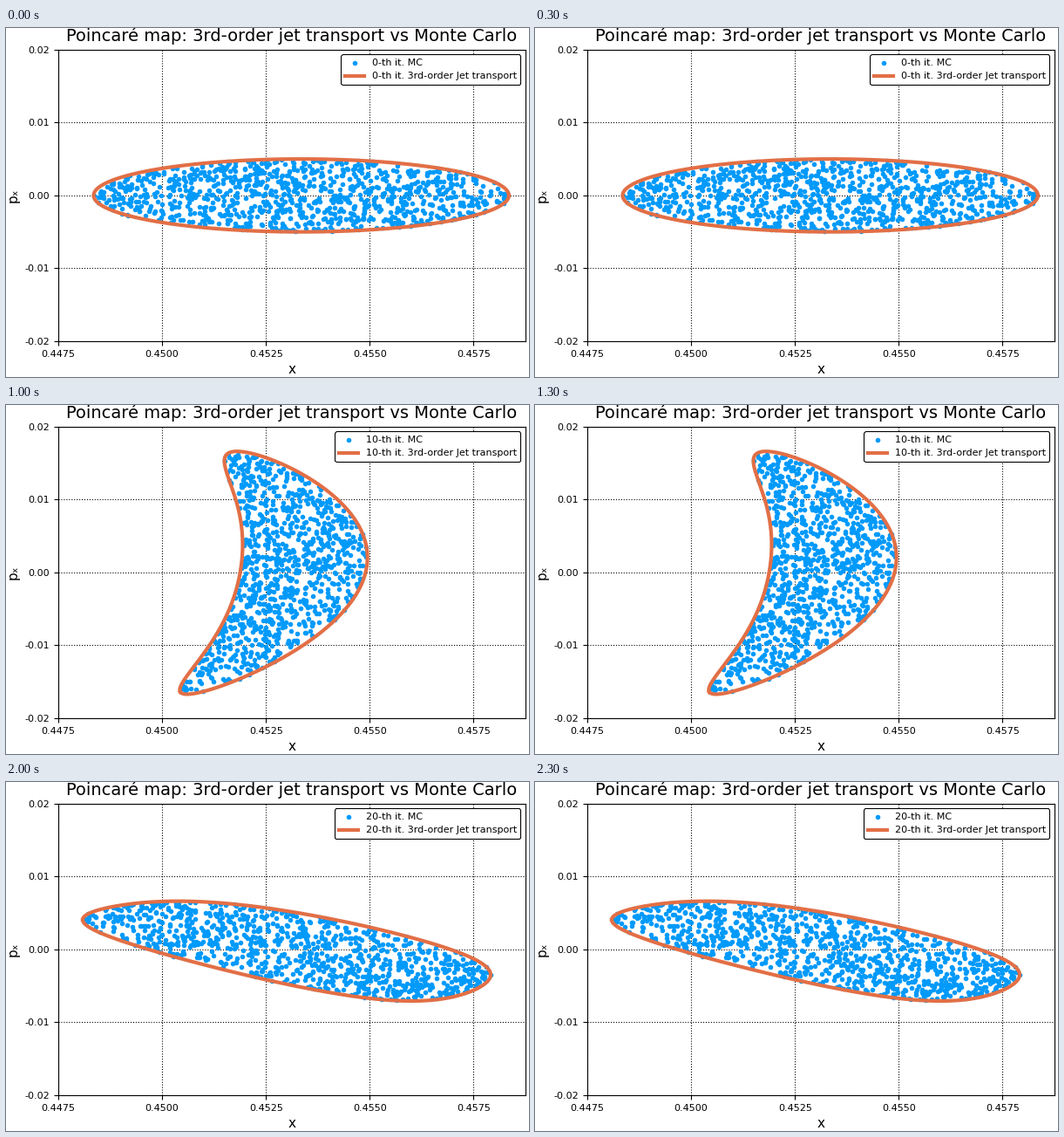
Write a matplotlib script that moves like this. It is 600 px wide and 400 px high and loops after 2500 ms.

```python
import numpy as np
import matplotlib.pyplot as plt
from matplotlib.animation import FuncAnimation
from numpy.polynomial.polynomial import polyval

W, H, DPI = 600, 400, 100
LEFT, RIGHT, TOP, BOTTOM = 60, 596, 24.9, 358.9
X0, X_SCALE, Y_SCALE, Y_ZERO = 0.4475, 47640, 8350, 192
BLUE, ORANGE = "#009AFA", "#E26F46"

plt.rcParams["font.family"] = "DejaVu Sans"

# Each map sends the unit disc (u, v) to the stage as spine(u) + v * width(u).
# Coefficients rise in powers of u; x + yj is a point in stage pixels.
MAPS = [
    ([338.7 + 192j, 238.2], [-41.75j]),
    ([335 + 198j, 161 + 103j, -45 - 6j, 4 - 6j],
     [20 - 53j, 31 - 11.5j, 8 + 8j]),
    ([341 + 190j, -27 + 136.5j, -114 + 2.5j], [72, -9 + 27.5j, -45]),
    ([342 + 186.5j, -203 + 72j, -30 + 12.5j, -4j],
     [22 + 40.5j, -12j, -22 + 9.5j]),
    ([335 + 193j, -234 - 35.5j, -13 - 3.5j, 4j],
     [40 + 49j, -4j, -40 - 12j]),
]


def transport(step, u, v):
    """Carry disc points to data coordinates at the given step."""
    spine, width = MAPS[step]
    z = polyval(u, spine) + v * polyval(u, width)
    return np.column_stack([X0 + (z.real - LEFT) / X_SCALE,
                            (Y_ZERO - z.imag) / Y_SCALE])


rng = np.random.default_rng(7)
radius = np.sqrt(rng.random(1000))
angle = rng.uniform(0, 2 * np.pi, 1000)
sample = radius * np.cos(angle), radius * np.sin(angle)
t = np.linspace(0, 2 * np.pi, 400)
rim = np.cos(t), np.sin(t)

fig = plt.figure(figsize=(W / DPI, H / DPI), dpi=DPI, facecolor="white")
ax = fig.add_axes([LEFT / W, 1 - BOTTOM / H,
                   (RIGHT - LEFT) / W, (BOTTOM - TOP) / H])
ax.set_xlim(X0, X0 + (RIGHT - LEFT) / X_SCALE)
ax.set_ylim(-0.02, 0.02)
xticks = X0 + 0.0025 * np.arange(5)
yticks = 0.01 * np.arange(-2, 3)
ax.set_xticks(xticks, [f"{x:.4f}" for x in xticks])
ax.set_yticks(yticks, [f"{y:.2f}" for y in yticks])
ax.tick_params(labelsize=8)
ax.set_axisbelow(True)
ax.grid(color="black", linestyle=":", linewidth=0.8)
ax.set_title("Poincaré map: 3rd-order jet transport vs Monte Carlo",
             fontsize=14, pad=6.8)
ax.set_xlabel("x", fontsize=11)
ax.set_ylabel("pₓ", fontsize=11)

dots = ax.scatter([], [], s=16, color=BLUE, linewidths=0, zorder=2)
line, = ax.plot([], [], color=ORANGE, linewidth=3, zorder=3)


def update(step):
    dots.set_offsets(transport(step, *sample))
    line.set_data(*transport(step, *rim).T)
    name = f"{5 * step}-th it."
    legend = ax.legend(
        [dots, line], [f"{name} MC", f"{name} 3rd-order Jet transport"],
        loc="upper right", fontsize=8, scatterpoints=1,
        framealpha=1, facecolor="white", edgecolor="black")
    legend.get_frame().set_linewidth(0.8)
    return dots, line


anim = FuncAnimation(fig, update, frames=len(MAPS), interval=500, repeat=True,
                     repeat_delay=0)
plt.show()
```
